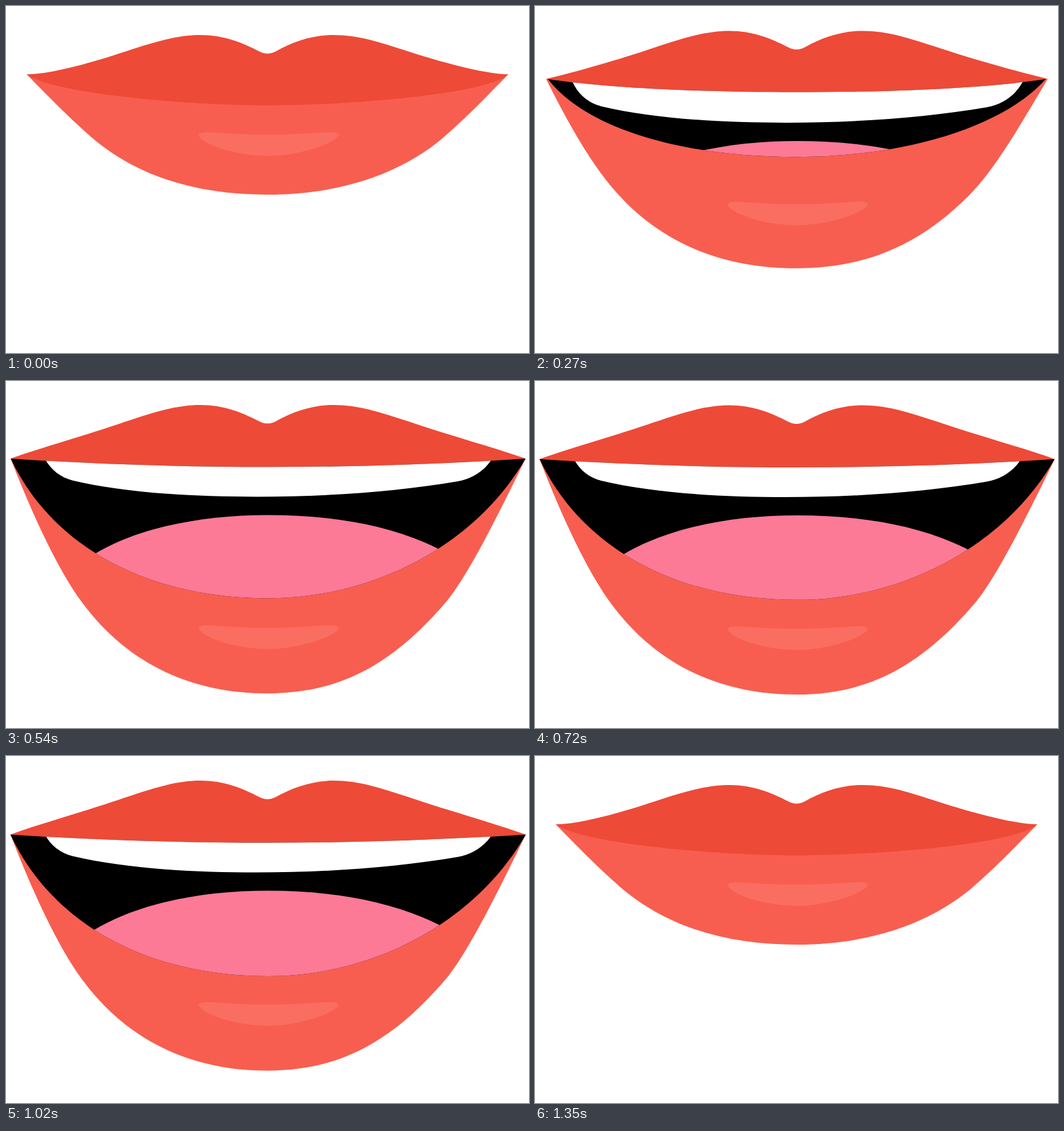
An HTML page that plays this animation: 830 px wide and 550 px high, repeating every 1590 ms.

```html
<!DOCTYPE html>
<html lang="en">
<head>
<meta charset="utf-8">
<title>Talking mouth</title>
<style>
html, body { margin: 0; width: 100%; height: 100%; overflow: hidden; background: #fff; }
svg { display: block; width: 830px; height: 550px; }
</style>
</head>
<body>
<svg viewBox="0 0 830 550">
  <defs><clipPath id="hole"><path id="holeShape"/></clipPath></defs>
  <g id="mouth">
    <path id="lower" fill="#f85e4f"/>
    <path id="upper" fill="#ed4a38"/>
    <g id="inside">
      <path id="dark" fill="#000"/>
      <g clip-path="url(#hole)">
        <g transform="translate(0 7.5)">
          <path fill="#fff" d="M55 105C62 135 82 152 105 158C185 177 290 184 398 184C510 184 620 176 717 159.5C745 154 768 138 779 108Z"/>
          <path fill="#fc7a96" d="M120 400V286L140 275C210 233 310 213 416 213C520 213 615 230 689 268L715 282V400Z"/>
        </g>
      </g>
    </g>
    <path id="shine" fill="#fff" fill-opacity=".1" d="M306 204.5C307 199 320 200 340 201.3C390 204.7 440 204.7 490 201.3C510 200 527 198 528 204.5C526 215 470 237.5 416 237.5C360 237.5 308 217 306 204.5Z"/>
  </g>
</svg>
<script>
const LOOP = 1590, STEP = 30;
const $ = id => document.getElementById(id);

// Each shape: closed form, open form.
const bow = 'C235 57.5 270 46 309 46C345 46 375 58 402 72C410 76.5 420 76.5 428 72' +
            'C455 57 485 46 520 46C560 46 595 58 640 72.5';
const upper = [
  'M33 108.5C75 107.5 140 88.5 190 72' + bow +
  'C690 88.5 755 107 797 108.5C760 141 540 157.5 415 157.5C300 157.5 80 141 33 108.5Z',
  'M7 131.5C55 114 130 93.5 190 72.5' + bow +
  'C700 93 770 112 825 131.5C690 140 550 144.5 415 144.5C280 144.5 140 140 7 131.5Z'
];
const lower = [
  'M33 108.5C65 141 95 172 135 207.5C210 272 305 299 415 299C525 299 620 269 690 212C730 178 765 141 797 108.5Z',
  'M7 131.5C45 230 85 313 120 360.5C190 456 290 506 415 506C529 506 613 461 700 358.5C734 317 784 216 825 131.5Z'
];
const dark = [
  'M33 114C90 134 240 142 415 142C590 142 740 134 797 114C740 134 590 142 415 142C240 142 90 134 33 114Z',
  'M7 131.5C72 271.5 222 356.5 415 356.5C592 356.5 750 263.5 825 131.5C690 140 550 144.5 415 144.5C280 144.5 140 140 7 131.5Z'
];

// Poses: lift of the whole mouth, openness, drop of the shine below its rest place.
const rest = { lift: 0, open: 0, shine: 0 };
const ready = { lift: -10, open: 0, shine: -10 };
const wide = { lift: -4.2, open: 1.022, shine: 196 };
const half = { lift: -10, open: .97, shine: 183 };

// Lift, open up, chatter between two open poses, close.
const FIRST = 326, BEAT = 155;
const keys = [[45, rest], [200, ready]];
for (let i = 0; i < 6; i++) keys.push([FIRST + i * BEAT, i % 2 ? half : wide]);
keys.push([1350, rest]);

const lerp = (a, b, s) => a + (b - a) * s;
const ease = s => s * s * (3 - 2 * s);

function poseAt(t) {
  const i = keys.findIndex(k => k[0] > t);
  if (i < 1) return rest;
  const [t0, a] = keys[i - 1], [t1, b] = keys[i];
  const s = ease((t - t0) / (t1 - t0));
  return {
    lift: lerp(a.lift, b.lift, s),
    open: lerp(a.open, b.open, s),
    shine: lerp(a.shine, b.shine, s)
  };
}

function mix([a, b], s) {
  const to = b.match(/[\d.]+/g);
  let i = 0;
  return a.replace(/[\d.]+/g, n => lerp(+n, +to[i++], s).toFixed(2));
}

const shift = (id, y) => $(id).setAttribute('transform', `translate(0 ${y})`);

function draw(time) {
  const p = poseAt(Math.floor(time % LOOP / STEP) * STEP);
  const gap = mix(dark, p.open ** 1.4);
  $('upper').setAttribute('d', mix(upper, p.open));
  $('lower').setAttribute('d', mix(lower, p.open));
  $('dark').setAttribute('d', gap);
  $('holeShape').setAttribute('d', gap);
  $('inside').style.display = p.open < .03 ? 'none' : '';
  shift('mouth', p.lift);
  shift('shine', p.shine - p.lift);
}

const start = performance.now();
function tick() {
  draw(performance.now() - start);
  requestAnimationFrame(tick);
}
tick();
</script>
</body>
</html>
```
